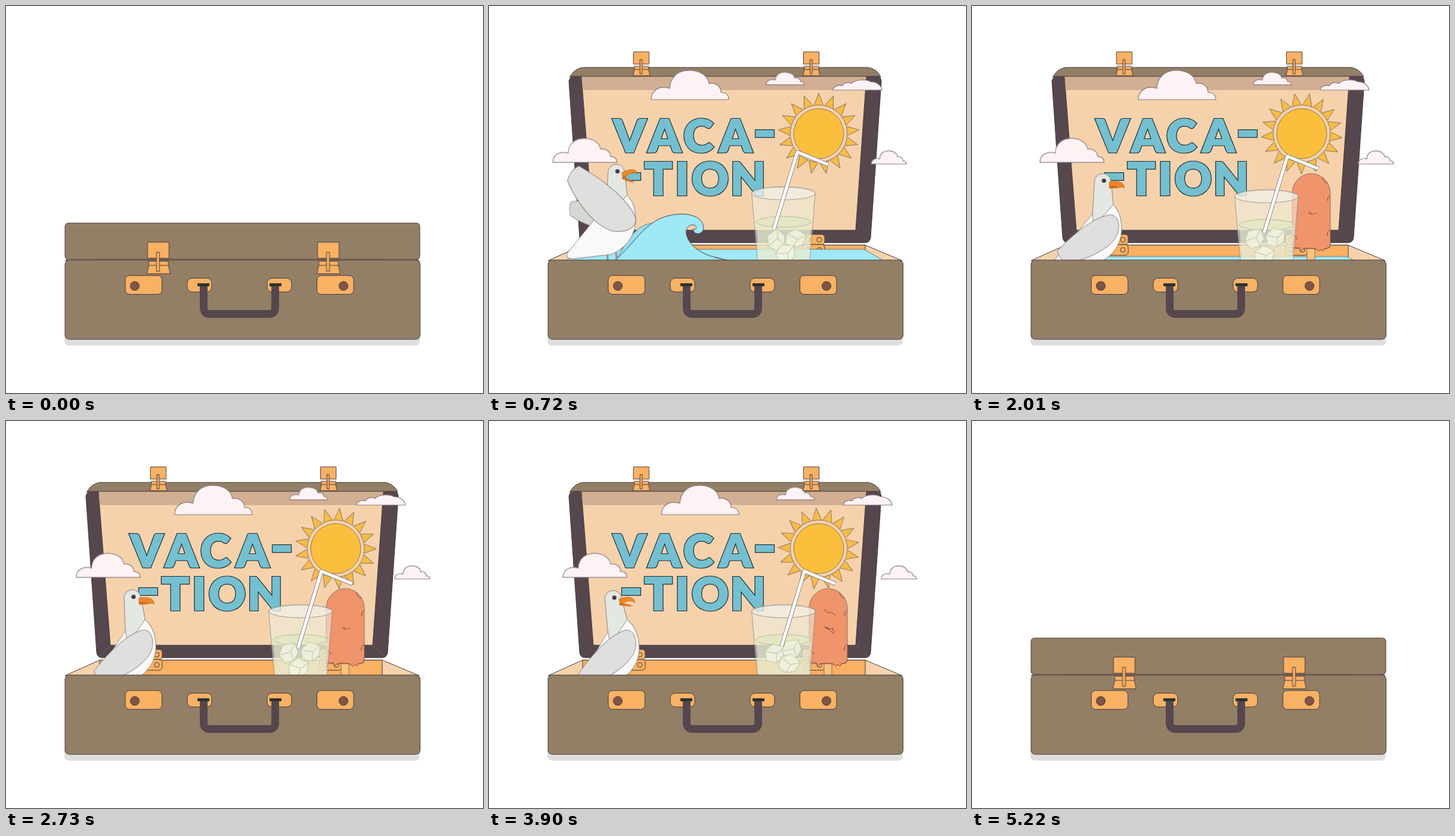
Animation of 800 by 649 pixels, one loop 5.25 s. Source, as an HTML page without scripts:

```html
<!DOCTYPE html>
<html lang="en">
<head>
<meta charset="utf-8">
<title>Vacation suitcase</title>
<style>
html, body { margin: 0; width: 100%; height: 100%; overflow: hidden; background: #fff; }
svg { display: block; width: 100%; height: 100%; }
svg * { animation-duration: 5.25s; animation-iteration-count: infinite; animation-timing-function: linear; }

.ln { stroke: #453a3e; stroke-width: 1; stroke-linejoin: round; }
.thin { stroke: #6b6263; stroke-width: .8; stroke-linejoin: round; }
.brown { fill: #937f66; }
.dark { fill: #55474d; }
.gold { fill: #f9b163; }
.gold * { vector-effect: non-scaling-stroke; }
.sand { fill: #f6d2ac; }
.sea { fill: #9fe9f7; }
.word { font: 900 76.5px Lato, "Open Sans", sans-serif; text-anchor: middle; }
.edge { fill: #1f2b30; stroke: #1f2b30; stroke-width: 4.2; }
.sky { fill: #74c0d0; stroke: #74c0d0; stroke-width: 1.8; }
.cloud { fill: #fdf3f5; stroke: #857b80; stroke-width: 1.2; vector-effect: non-scaling-stroke; }
.crack { fill: none; stroke: #7d4a3a; stroke-width: 1; stroke-linecap: round; }

/* suitcase */
.lid { animation-name: lid; transform-origin: 396px 425px; }
.strip { animation-name: strip; }
.latch { animation-name: latch; }
@keyframes lid {
  0%, 1.7% { transform: scale(1.149, 0); animation-timing-function: ease-in-out; }
  8.6%, 85.7% { transform: none; animation-timing-function: ease-in-out; }
  92.6%, 100% { transform: scale(1.149, 0); }
}
@keyframes strip {
  0%, 1.7%, 92.6%, 100% {
    d: path("M99 419 L99 370 Q99 364 105 364 L688 364 Q694 364 694 370 L694 419 Q694 425 688 425 L105 425 Q99 425 99 419Z");
    animation-timing-function: ease-in-out;
  }
  8.6%, 85.7% {
    d: path("M135 120 L138 115 Q145 105 157 103 L636 103 Q648 105 655 115 L657 120 Q656 118 654 118 L139 118 Q136 118 135 120Z");
    animation-timing-function: ease-in-out;
  }
}
@keyframes latch {
  0%, 96%, 100% { transform: translateY(0) scale(1, 1); }
  1.7%, 92.6% { transform: translateY(0) scale(1, .85); animation-timing-function: ease-in-out; }
  8.6%, 85.7% { transform: translateY(-319px) scale(.73, .755); animation-timing-function: ease-in-out; }
}

/* sky */
.rays { animation-name: rays; }
.drift { animation-name: drift; }
.puff { animation-name: puff; transform-box: fill-box; transform-origin: center; }
@keyframes rays { from { transform: rotate(5.6deg); } to { transform: rotate(-35.4deg); } }
@keyframes drift { from { transform: translateX(-3.8px); } to { transform: translateX(24.2px); } }
@keyframes puff {
  0%, 6.8%, 87%, 100% { transform: scale(0); }
  10.2%, 83.4% { transform: none; }
}

/* sea */
.water { animation-name: water; }
.wave { animation-name: wave; }
@keyframes water {
  0%, 6%, 46%, 100% { transform: translateY(19px); }
  10%, 20% { transform: none; }
  25.1% { transform: translateY(1px); }
  38.3% { transform: translateY(12px); }
}
@keyframes wave {
  0%, 7.6% { transform: translate(-130px, 85px); }
  13.7% { transform: none; }
  25.1% { transform: translate(217px, 28px); }
  32%, 100% { transform: translate(340px, 90px); }
}

/* treats */
.pop { animation-name: pop; }
.melt { animation-name: melt; }
.melt2 { animation-name: melt2; }
.glass { animation-name: glass; }
.straw { animation-name: straw; }
.i1 { animation-name: i1; } .i2 { animation-name: i2; } .i3 { animation-name: i3; }
@keyframes pop {
  0%, 11% { transform: translate(-225px, 160px); }
  13.7% { transform: translate(-192px, 141px); }
  20% { transform: translate(-62px, 22px); }
  25.1% { transform: translate(-2px, 0); }
  27%, 83.4% { transform: none; }
  87.6%, 100% { transform: translate(0, 160px); }
}
@keyframes melt { 0%, 27% { opacity: 0; } 36%, 100% { opacity: 1; } }
@keyframes melt2 { 0%, 56% { opacity: 0; } 70%, 100% { opacity: 1; } }
@keyframes glass {
  0%, 7.6%, 87.6%, 100% { transform: translateY(190px); }
  12.4% { transform: translateY(-7px); }
  13.7% { transform: translateY(-5px); }
  18%, 83.4% { transform: none; }
}
@keyframes straw {
  0%, 13.7% { transform: translate(-12px, -2px); }
  19%, 100% { transform: none; }
}
@keyframes i1 { 0%, 13.7% { transform: translate(4px, 10px) rotate(-25deg); } 25%, 38.3% { transform: none; } 52% { transform: translate(1px, -1px); } 74.3%, 100% { transform: translate(5px, 2px) rotate(25deg); } }
@keyframes i2 { 0%, 13.7% { transform: translate(5px, 7px) rotate(20deg); } 25%, 38.3% { transform: none; } 52% { transform: translate(2px, -1px); } 74.3%, 100% { transform: translate(-1px, -5px) rotate(-22deg); } }
@keyframes i3 { 0%, 13.7% { transform: translate(8px, 1px) rotate(-20deg); } 25%, 38.3% { transform: none; } 52% { transform: translate(0, -4px); } 74.3%, 100% { transform: translate(11px, -13px) rotate(18deg); } }

/* gull */
.gull { animation-name: gull; transform-origin: 235px 370px; }
.face { animation-name: face; transform-origin: 225px 294px; }
.wing { animation-name: wing; transform-origin: 228px 368px; }
.back { animation-name: back; transform-origin: 228px 368px; }
.bill, .jaw { transform-origin: 237px 300px; }
.bill { animation-name: bill; }
.jaw { animation-name: jaw; }
@keyframes gull {
  0%, 7.6% { transform: translate(-5px, 160px) rotate(-5deg); }
  12% { transform: translate(-5px, -18px) rotate(-5deg); }
  13.7% { transform: translate(-5px, -16px) rotate(-5deg); }
  18%, 25.1% { transform: translate(0, 0) rotate(0deg); }
  38.3% { transform: translate(0, 0) rotate(-4.4deg); }
  52% { transform: translate(0, 0) rotate(-10deg); }
  74.3%, 83.4% { transform: translate(0, 0) rotate(-13deg); }
  87.6%, 100% { transform: translate(0, 160px) rotate(-13deg); }
}
@keyframes face {
  0%, 13.7% { transform: rotate(5deg); }
  18%, 25.1% { transform: rotate(0deg); }
  38.3% { transform: rotate(4.4deg); }
  52% { transform: rotate(10deg); }
  74.3%, 100% { transform: rotate(13deg); }
}
@keyframes wing {
  0%, 13.7% { transform: translateY(3px) rotate(78deg) scale(1.2); }
  18.5%, 100% { transform: translateY(0) rotate(0deg) scale(1); }
}
@keyframes back {
  0%, 13.7% { transform: rotate(44deg) scale(.93); }
  18.5%, 100% { transform: rotate(0deg) scale(.8); }
}
@keyframes bill {
  0%, 14.5% { transform: rotate(-20deg); }
  19%, 22% { transform: rotate(0deg); }
  25.1%, 27% { transform: rotate(-4deg); }
  30%, 70% { transform: rotate(0deg); }
  73%, 77% { transform: rotate(-10deg); }
  80%, 100% { transform: rotate(0deg); }
}
@keyframes jaw {
  0%, 14.5% { transform: rotate(24deg); }
  19%, 22% { transform: rotate(0deg); }
  25.1%, 27% { transform: rotate(20deg); }
  30%, 70% { transform: rotate(0deg); }
  73%, 77% { transform: rotate(9deg); }
  80%, 100% { transform: rotate(0deg); }
}
</style>
</head>
<body>
<svg viewBox="0 0 800 649" preserveAspectRatio="none">
<defs>
  <clipPath id="above"><rect width="800" height="428"/></clipPath>
  <!-- seventeen rays, 360 / 17 degrees apart -->
  <path id="ray" class="thin" fill="#f9bc45" d="M-8 -47 L0 -68 L8 -47 Q0 -49 -8 -47Z"/>
  <g id="ray2"><use href="#ray"/><use href="#ray" transform="rotate(21.18)"/></g>
  <g id="ray4"><use href="#ray2"/><use href="#ray2" transform="rotate(42.35)"/></g>
  <g id="ray8"><use href="#ray4"/><use href="#ray4" transform="rotate(84.7)"/></g>
  <path id="cloud" class="cloud" d="M0 49 C0 33 14 25 31 30 C32 10 46 0 64 0 C82 0 95 9 97 22 C108 20 117 27 117 37 C126 37 130 42 130 49Z"/>
  <path id="feather" class="thin" d="M140 404 C165 380 205 352 232 350 C248 350 250 372 240 388 C225 410 180 424 155 425 Q143 418 140 404Z"/>
  <g id="cube" transform="scale(1.12)" stroke="#bcc79a" stroke-width=".9" stroke-linejoin="round" fill="#f3f4e2" fill-opacity=".85">
    <path d="M-15 -3 L-4 -14 L14 -10 L13 6 L2 14 L-12 11Z"/>
    <path fill="none" d="M-15 -3 L3 0 L14 -10 M3 0 L2 14"/>
  </g>
  <g id="hinge" class="gold ln">
    <rect width="37" height="17" rx="5"/><rect y="17" width="37" height="18" rx="5"/>
    <circle cx="9" cy="9" r="4"/><circle cx="28" cy="9" r="4"/>
    <circle cx="9" cy="26" r="4"/><circle cx="28" cy="26" r="4"/>
  </g>
  <g id="latch" class="gold ln">
    <rect x="-18" width="36" height="27"/>
    <path d="M-16 32 H17 V39 L20 53 H-19 L-16 39Z M-16 39 H17"/>
    <rect x="-3" y="17" width="5" height="32"/>
  </g>
  <rect id="mount" class="gold ln" width="41" height="23" rx="8"/>
  <g id="title" class="word">
    <text x="236 294.5 351 413.5" y="245">VACA</text>
    <rect x="448" y="209" width="29" height="10"/>
    <rect x="224" y="281" width="29" height="10"/>
    <text x="284 324 371 434.5" y="317">TION</text>
  </g>
</defs>

<rect x="98" y="545" width="596" height="24.5" rx="7" fill="#dedede"/>

<!-- inside of the case -->
<path class="sand ln" d="M99 427 L157 401 H631 L693 427Z"/>
<path class="gold ln" d="M157 401 H631 V427 H157Z"/>

<g class="lid">
  <path class="dark ln" d="M134 126 Q136 117 145 117 H648 Q657 117 658 126 L640 388 Q639 397 630 397 H162 Q153 397 152 388Z"/>
  <path class="sand ln" d="M155 118 H633 L615 376 H175Z"/>
  <path fill="#d2ae92" d="M155.5 118 H632.5 L631 141 H157Z"/>
  <path fill="none" class="thin" d="M175 376 L158 394 M615 376 L635 394"/>
  <use href="#title" class="edge"/>
  <use href="#title" class="sky"/>
  <g transform="translate(553 214)">
    <g class="rays">
      <use href="#ray8"/>
      <use href="#ray8" transform="rotate(169.4)"/>
      <use href="#ray" transform="rotate(-21.18)"/>
    </g>
    <circle class="thin" r="42" fill="#fcbf3d"/>
  </g>
</g>

<use href="#hinge" x="225" y="383"/>
<use href="#hinge" x="526" y="383"/>
<g clip-path="url(#above)">
  <path class="sea water thin" d="M160 408 H629 L662 427 H128Z"/>
</g>
<path class="strip brown ln" d="M99 419 L99 370 Q99 364 105 364 L688 364 Q694 364 694 370 L694 419 Q694 425 688 425 L105 425 Q99 425 99 419Z"/>

<g clip-path="url(#above)">
  <g class="pop">
    <rect class="thin" x="562" y="400" width="13" height="60" fill="#fbc27c"/>
    <path class="thin" fill="#ef946b" d="M537 314 A32 33 0 0 1 601 314 V400 Q601 407 594 407 H544 Q537 407 537 400Z"/>
    <path class="crack" d="M566 347 h3 M574 348 h3"/>
    <g class="melt">
      <path fill="#ef946b" d="M538 398 V402 Q544 406 549 405 Q551 414 554 407 Q565 402 578 407 Q581 413 585 408 Q589 414 591 406 Q600 406 600 398Z"/>
      <path class="crack" d="M537 402 Q544 408 549 405 Q551 414 554 408 Q565 404 578 408 Q581 414 585 408 Q589 414 591 407 Q601 406 601 400 M588 288 q1 8 8 9 M600 318 q-5 3 -3 9 M564 346 q4 5 8 3 M539 385 q5 1 6 6 M600 375 q-5 3 -4 10"/>
    </g>
    <path class="crack melt2" d="M562 316 l8 6 l3 -2 l8 6 M562 345 l9 4 l5 7 l4 -3 M577 352 l-1 -4"/>
  </g>

  <g class="glass">
    <path fill="#edf0e4" fill-opacity=".55" stroke="#8c8a84" stroke-width=".8" d="M440.5 319 A53.5 11 0 0 1 547 319 L537 450 H452Z"/>
    <ellipse cx="494" cy="319" rx="53.5" ry="11" fill="#f4f3ee" fill-opacity=".5" stroke="#8c8a84" stroke-width=".8"/>
    <path fill="#e6ebce" fill-opacity=".6" d="M448 367 A46 9 0 0 1 540 367 L534 450 H455Z"/>
    <ellipse cx="494" cy="367" rx="46" ry="9" fill="#dfe5bd" fill-opacity=".5" stroke="#a9b18a" stroke-width=".8"/>
    <g class="straw" fill="none" stroke-linejoin="round">
      <path stroke="#8d8885" stroke-width="7" d="M490 380 L529 252 L581 273"/>
      <path stroke="#fff" stroke-width="5" d="M490 380 L529 252 L580.5 272.8"/>
    </g>
    <g transform="translate(474 390) rotate(-25)"><g class="i1"><use href="#cube"/></g></g>
    <g transform="translate(509 388)"><g class="i2"><use href="#cube"/></g></g>
    <g transform="translate(490 418) rotate(10)"><g class="i3"><use href="#cube"/></g></g>
  </g>

  <g class="wave">
    <path class="thin" fill="#93dff0" d="M205 440 C226 402 243 364 276 364 L300 440Z"/>
    <path class="sea ln" d="M190 440 C245 410 254 352 318 349 C350 347 363 364 358 377 C353 385 341 382 342 374 C348 376 349 369 343 367 C332 366 327 376 332 388 C342 412 372 422 405 427 V480 H190Z"/>
  </g>

  <g class="gull">
    <path d="M198 415 V450 M213 410 V450" stroke="#8f9391" stroke-width="3"/>
    <g class="back"><use href="#feather" fill="#d3d8d0"/></g>
    <path class="thin" fill="#f9f9f7" d="M239 333 C253 346 258 385 236 410 Q225 423 205 430 L140 432 Q127 430 131 422 L205 345Z"/>
    <path class="thin" fill="#e4e8e3" d="M211 294 A14 14 0 0 1 239 294 L240 333 L204 368 V345Z"/>
    <g class="wing"><use href="#feather" fill="#dfe0de"/></g>
    <g class="face">
      <path class="jaw" fill="#d96f1f" d="M236 300 L259 302 Q255 305 236 305Z"/>
      <path class="bill" fill="#f5861f" stroke="#8a5326" stroke-width=".6" d="M236 294 C248 292 262 293 261 305 Q257 300 250 300 L236 302Z"/>
      <circle cx="227" cy="292" r="3.6" fill="#43363a"/>
    </g>
  </g>
</g>

<g class="drift">
  <g transform="translate(272 108)"><use class="puff" href="#cloud"/></g>
  <g transform="translate(465 111) scale(.49 .43)"><use class="puff" href="#cloud"/></g>
  <path class="cloud puff" d="M577 141 C578 134 586 132 592 134 C595 128 604 127 608 130 C615 123 632 122 640 127 C650 127 658 133 659 141Z"/>
  <g transform="translate(107 222) scale(.825 .82)"><use class="puff" href="#cloud"/></g>
  <g transform="translate(641 243) scale(.455 .45)"><use class="puff" href="#cloud"/></g>
</g>

<!-- front of the case -->
<rect class="brown ln" x="99" y="426" width="595.5" height="133" rx="7"/>
<rect class="gold ln" x="200" y="452" width="61.5" height="31.5" rx="7"/>
<rect class="gold ln" x="521.5" y="452" width="61.5" height="31.5" rx="7"/>
<circle class="ln" cx="216" cy="469.5" r="7.5" fill="#7f5546"/>
<circle class="ln" cx="566" cy="469.5" r="7.5" fill="#7f5546"/>
<use href="#mount" x="304" y="456.5"/>
<use href="#mount" x="438" y="456.5"/>
<path fill="none" stroke="#55474d" stroke-width="13" d="M331.5 467 V506 Q331.5 516.5 342 516.5 H441 Q451.5 516.5 451.5 506 V467"/>
<path stroke="#2b3230" stroke-width="5" d="M321 467.5 h20 M442 467.5 h20"/>

<g transform="translate(255.3 396)"><g class="latch"><use href="#latch"/></g></g>
<g transform="translate(540.5 396)"><g class="latch"><use href="#latch"/></g></g>
</svg>
</body>
</html>
```
